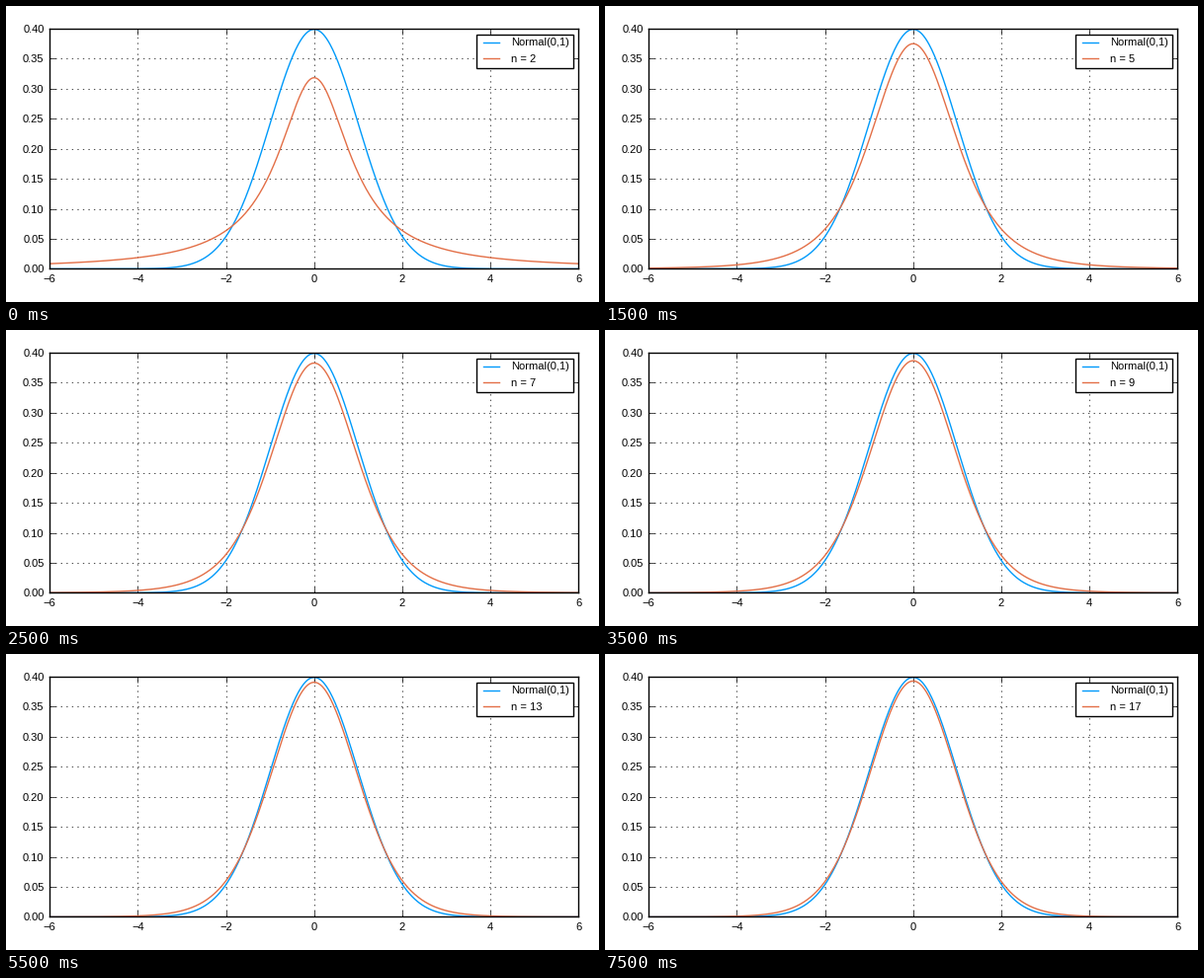
Recreate the animation shown at these times as a matplotlib script. Size 600 by 300 pixels, loop 8000 ms.

```python
import math

import matplotlib.pyplot as plt
import numpy as np
from matplotlib.animation import FuncAnimation

W, H, DPI = 600, 300, 100
LEFT, RIGHT, TOP, BOTTOM = 44.15, 579.45, 23.0, 266.42
BLUE, ORANGE = "#009AFA", "#E36F47"
FIRST_N, FRAMES, STEP_MS = 2, 16, 500

plt.rcParams.update({
    "font.family": "Liberation Sans",
    "font.size": 8,
    "lines.scale_dashes": False,
    "lines.dash_capstyle": "butt",
    "axes.linewidth": 1.0,
    "patch.linewidth": 1.0,
})


def normal_pdf(x):
    return np.exp(-x ** 2 / 2) / math.sqrt(2 * math.pi)


def student_pdf(x, df):
    scale = math.gamma((df + 1) / 2) / (math.sqrt(df * math.pi) * math.gamma(df / 2))
    return scale * (1 + x ** 2 / df) ** (-(df + 1) / 2)


fig = plt.figure(figsize=(W / DPI, H / DPI), dpi=DPI, facecolor="white")
ax = fig.add_axes([LEFT / W, 1 - BOTTOM / H, (RIGHT - LEFT) / W, (BOTTOM - TOP) / H])
ax.set(xlim=(-6, 6), ylim=(0, 0.4))
ax.set_xticks(np.arange(-6, 7, 2))
ax.set_yticks(np.arange(9) * 0.05)
ax.yaxis.set_major_formatter("{x:.2f}")
ax.tick_params(direction="in", length=4, width=0.5, pad=4, top=True, right=True)
ax.set_axisbelow(True)
ax.grid(color="black", linewidth=0.5, linestyle=(0, (1, 3)))

x = np.linspace(-6, 6, 601)
ax.plot(x, normal_pdf(x), color=BLUE, lw=1, label="Normal(0,1)")
curve, = ax.plot(x, student_pdf(x, FIRST_N - 1), color=ORANGE, lw=1,
                 label=f"n = {FIRST_N}")
legend = ax.legend(loc="upper right", fontsize=8, numpoints=2, fancybox=False,
                   framealpha=1, edgecolor="black", borderpad=0.35,
                   labelspacing=0.6, handlelength=2, handletextpad=0.8,
                   borderaxespad=0.5)
n_label = legend.get_texts()[1]


def update(i):
    n = FIRST_N + i
    curve.set_ydata(student_pdf(x, n - 1))
    n_label.set_text(f"n = {n}")
    return curve, n_label


anim = FuncAnimation(fig, update, frames=FRAMES, interval=STEP_MS,
                     repeat=True, repeat_delay=0)
plt.show()
```
